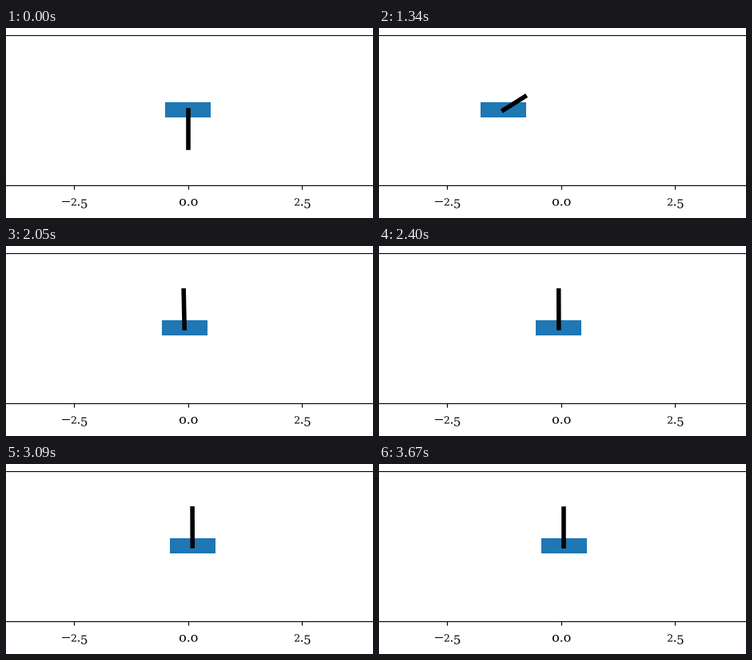
Recreate the animation shown at these times as a matplotlib script. Size 459 by 238 pixels, loop 3.72 s.

```python
import numpy as np
import matplotlib.pyplot as plt
from matplotlib.animation import FuncAnimation
from matplotlib.patches import PathPatch, Rectangle
from matplotlib.textpath import TextPath
from matplotlib.transforms import Affine2D

W, H, DPI = 459, 238, 128
PX = 72 / DPI                      # points per pixel
UNIT, X0 = 57, 227.75              # pixels per unit, pixel of x = 0
TOP, BOTTOM = 8.75, 196.75
TICK_MS, LOOP_MS = 10, 3720

# Bursts of motion: first change, last change, number of steps
BURSTS = [(1020, 1540, 11), (1590, 2050, 10), (2120, 2630, 12),
          (2730, 3240, 12), (3290, 3670, 9)]
CHANGES = np.concatenate([np.linspace(*b) for b in BURSTS])
CHANGES = np.round(CHANGES / TICK_MS) * TICK_MS

# time, cart position, pole angle in degrees from hanging down
KEYS = np.array([
    (970, 0, 0), (1020, .12, -19.5), (1070, -.04, 6), (1120, -.42, 62),
    (1170, -.86, 122), (1220, -1.21, 152), (1270, -1.35, 148),
    (1340, -1.25, 104), (1440, -1.20, 33), (1540, -1.13, -37),
    (1590, -.98, -72), (1690, -.60, -120), (1800, -.30, -156),
    (1930, -.12, -174), (2050, -.08, -178), (2160, -.11, -180.5),
    (2300, -.09, -181), (2450, -.03, -179), (2630, .02, -178),
    (2730, .05, -177.5), (2930, .135, -179), (3090, .08, -180),
    (3240, .03, -181), (3430, -.003, -180.5), (3670, .06, -180)])


def hermite(t, ts, vs):
    """Smooth curve through the key values."""
    slopes = np.gradient(vs, ts)
    i = int(np.clip(np.searchsorted(ts, t, "right") - 1, 0, len(ts) - 2))
    h = ts[i + 1] - ts[i]
    u = (t - ts[i]) / h
    return ((1 + 2 * u) * (1 - u) ** 2 * vs[i]
            + u * (1 - u) ** 2 * h * slopes[i]
            + u * u * (3 - 2 * u) * vs[i + 1]
            + u * u * (u - 1) * h * slopes[i + 1])


def pose(t):
    past = CHANGES[CHANGES <= t]
    if not len(past):
        return 0.0, 0.0
    x, angle = (hermite(past[-1], KEYS[:, 0], KEYS[:, c]) for c in (1, 2))
    return x, np.radians(angle)


# Old-style figures: drawn glyph, size, drop below the baseline
GLYPHS = {"0": ("o", 16, 0), "2": ("2", 12.5, 0), "5": ("5", 15, 3),
          ".": (".", 16, 0), "\u2212": ("\u2212", 15, 0)}


def label(fig, text, cx, baseline, gap=2.2):
    pen, paths = 0, []
    for ch in text:
        glyph, size, drop = GLYPHS[ch]
        path = TextPath((0, 0), glyph, size=size,
                        prop={"family": "DejaVu Serif"})
        box = path.get_extents()
        paths.append((path, pen - box.x0, -drop))
        pen += box.width + gap
    left = cx - (pen - gap) / 2
    for path, dx, dy in paths:
        place = Affine2D().translate(left + dx, H - baseline + dy)
        fig.add_artist(PathPatch(path, fc="black", lw=0, transform=place))


fig = plt.figure(figsize=(W / DPI, H / DPI), dpi=DPI, facecolor="white")
ax = fig.add_axes([0, (H - BOTTOM) / H, 1, (BOTTOM - TOP) / H])
ax.set_xlim(-X0 / UNIT, (W - X0) / UNIT)
ax.set_ylim(-1, 1)
ax.set_yticks([])
ax.set_xticks([-2.5, 0, 2.5], labels=[])
ax.tick_params(length=4.86 * PX, width=1.11 * PX)
for side, spine in ax.spines.items():
    spine.set_linewidth(1.11 * PX)
    spine.set_visible(side in ("top", "bottom"))

for value, text in ((-2.5, "\u22122.5"), (0, "0.0"), (2.5, "2.5")):
    label(fig, text, X0 + .5 + value * UNIT, 222.5)

cart = ax.add_patch(Rectangle((-.5, -.1), 1, .2, fc="#1f77b4", lw=0))
pole, = ax.plot([0, 0], [0, -.5], color="black", lw=5.56 * PX,
                solid_capstyle="projecting")


def draw(i):
    x, angle = pose(i * TICK_MS)
    cart.set_x(x - .5)
    pole.set_data([x, x + .5 * np.sin(angle)], [0, -.5 * np.cos(angle)])
    return cart, pole


anim = FuncAnimation(fig, draw, frames=LOOP_MS // TICK_MS, interval=TICK_MS,
                     repeat=True, repeat_delay=0)
plt.show()
```
